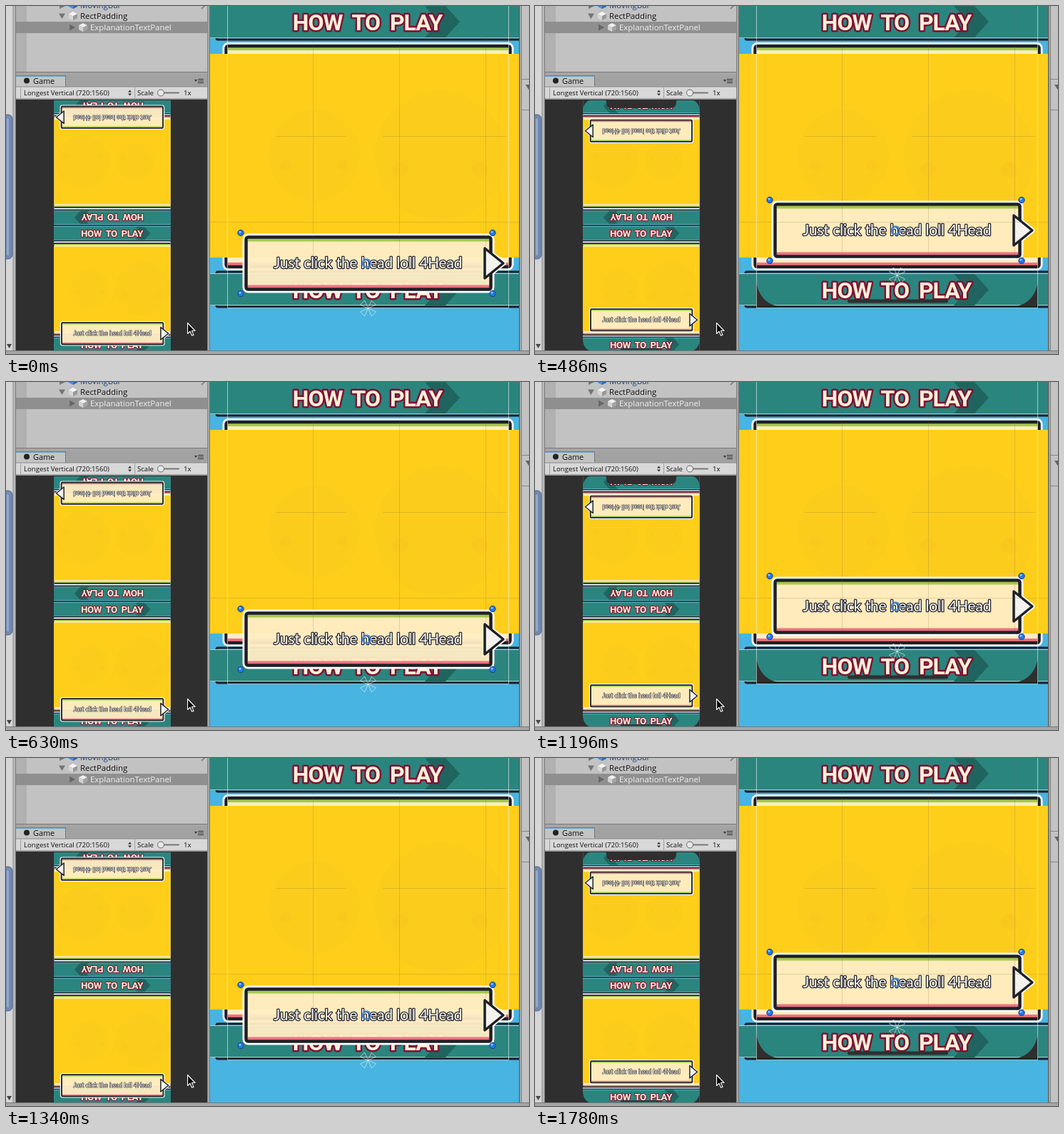
An HTML page for the animation above (1.96 s loop, 733x487 px).

```html
<!DOCTYPE html>
<html lang="en">
<head>
<meta charset="utf-8">
<title>Safe area panel</title>
<style>
  html, body { margin: 0; width: 100%; height: 100%; overflow: hidden; background: #a5a5a5; }
  svg { display: block; width: 733px; height: 487px; }
  text { white-space: pre; }
  .ui { font-family: "Open Sans", "Noto Sans", sans-serif; }
  .title {
    font: 700 32px Roboto, "Open Sans", sans-serif;
    letter-spacing: -1px; word-spacing: 7px; text-anchor: middle;
    fill: #fff0d8; stroke: #7c1434; stroke-width: 5px; stroke-linejoin: round; paint-order: stroke;
  }
  .message {
    font: 400 20.7px Lato, "Open Sans", sans-serif; text-anchor: middle;
    fill: #fff; stroke: #25252b; stroke-width: 2.6px; stroke-linejoin: round; paint-order: stroke;
  }
  .ink { fill: none; stroke: #1e1f24; }
  .guide { fill: none; stroke: #6b6240; stroke-opacity: .2; }
  .frame { fill: none; stroke: #fff; stroke-opacity: .55; }
</style>
</head>
<body>
<svg id="stage" viewBox="0 0 733 487" xmlns="http://www.w3.org/2000/svg"></svg>
<script>
const LOOP = 1960;
const SWITCHES = [270, 630, 980, 1340, 1780];
const TEAL = '#2b857f', INK = '#1e1f24', DARK = '#2f2f2f';

const rect = (x, y, w, h, fill, more = '') =>
  `<rect x="${x}" y="${y}" width="${w}" height="${h}" fill="${fill}" ${more}/>`;
const circle = (x, y, r, fill, more = '') =>
  `<circle cx="${x}" cy="${y}" r="${r}" fill="${fill}" ${more}/>`;
const path = (d, more) => `<path d="${d}" ${more}/>`;
const label = (x, y, size, str, fill = '#111') =>
  `<text class="ui" x="${x}" y="${y}" font-size="${size}" fill="${fill}">${str}</text>`;
const title = y => `<text class="title" x="506.5" y="${y + 12}">HOW TO PLAY</text>`;

// Dark chevron behind a title
const chevron = y => path(`M587 ${y - 22}h29l20 22l-20 22h-29l20 -22z`, 'fill="#20645f"');

const band = (top, bottom) =>
  rect(286, top + 3, 433, bottom - top - 5, TEAL) +
  path(`M719 ${top}H297q-2 0 -2 2`, 'class="ink" stroke-width="3"') +
  path(`M719 ${bottom}H297q-2 0 -2 -2`, 'class="ink" stroke-width="3"') +
  path(`M286 ${top + 2.5}H719M286 ${bottom - 2.5}H719`, 'stroke="#dff0ec" stroke-opacity=".6"');

const face = (x, y, r) =>
  circle(x, y, r, '#f8c722', 'fill-opacity=".4"') +
  [-1, 1].map(s => circle(x + s * r * .62, y + r * .22, r * .12, '#f5c01b', 'fill-opacity=".3"')).join('');

// Rounded box: white rim, dark border, green and pink edge stripes
const box = (x, y, w, h, fill, opacity) => {
  const outline = (color, width) =>
    rect(x, y, w, h, 'none', `rx="3" stroke="${color}" stroke-width="${width}"`);
  return outline('#fff', 10) +
    rect(x, y, w, h, fill, `rx="3" fill-opacity="${opacity}"`) +
    rect(x + 2, y + 2, w - 4, 4, '#a3c94b') + rect(x + 2, y + h - 6, w - 4, 4, '#f0717f') +
    outline(INK, 4.5);
};

const world =
  rect(286, -4, 433, 490, '#48b4e1') +
  band(-4, 47) + chevron(22) + title(22) +
  box(308.5, 56, 398, 309, '#fdedbf', 1) +
  rect(286, 67, 433, 285, '#fece1b') +
  face(432, 209, 64) + face(608, 209, 91) +
  band(372, 421) + chevron(397) + title(397);

// Message box with its pointer, drawn at the lower position
const ARROW = 'M671 339V381L697 360Z';
const panel =
  path(ARROW, 'fill="#fff" stroke="#fff" stroke-width="7" stroke-linejoin="round"') +
  box(336.5, 323.5, 343, 73, '#ffeec4', .95) +
  path(ARROW, `fill="#f3f2ee" stroke="${INK}" stroke-width="3.5" stroke-linejoin="round"`) +
  '<text class="message" x="507.5" y="367">Just click the head loll 4Head</text>';

// Rounded screen corners and home bar of the phone
const corners =
  path('M310 384V420H340C323 417 312 403 310 384Z M705 384V420H675C692 417 703 403 705 384Z', `fill="${DARK}"`) +
  rect(438, 410.5, 141, 5, DARK, 'rx="2.5"');

const lift = safe => `transform="translate(0 ${safe ? -46 : 0})"`;

const handle = (x, y) => circle(x, y, 4.2, '#2377e8', 'stroke="#163f86" stroke-width="1"') +
  circle(x - 1, y - 1.2, 1.5, '#8fc0ff');

const anchor = [0, 90, 180, 270].map(a =>
  path('M0 0L5 11L11 5Z', `transform="rotate(${a})" fill="none" stroke="#fff" stroke-opacity=".55"`)).join('');

const gizmos =
  [329, 682].map(x => handle(x, 317.5) + handle(x, 402.5)).join('') +
  circle(505.5, 360, 5.5, 'none', 'stroke="#377edb" stroke-width="2.5" stroke-opacity=".85"') +
  `<g transform="translate(507.5 423)">${anchor}</g>`;

const guides =
  path('M430.5 0V352M551.5 0V352M672.5 0V352M286 302.5H719M378 182.5H477M528 182.5H702', 'class="guide"') +
  path('M310.5 0V422.5H704.5V0', 'class="frame"');

const notch = path('M97 131q3 0 3 4q0 8 9 8H189q9 0 9 -8q0 -4 3 -4Z', `fill="${DARK}"`);

const defs = (id, safe) => `<g id="${id}Scene">
    <use href="#world"/>${safe ? corners : ''}<g ${lift(safe)}>${panel}</g></g>
  <g id="${id}Half" clip-path="url(#halfClip)">
    <use href="#${id}Scene" transform="translate(67 308.9) scale(.415) translate(-310 0)"/></g>`;

// The editor scene, and the phone showing it twice, once upside down
const view = (id, safe) => `<g id="${id}">
  <g clip-path="url(#sceneClip)"><use href="#${id}Scene"/>${guides}<g ${lift(safe)}>${gizmos}</g></g>
  <g clip-path="url(#phoneClip)">
    <use href="#${id}Half"/>
    <use href="#${id}Half" transform="rotate(180 149 307)"/>
    ${safe ? notch : ''}
  </g></g>`;

const cube = (x, y, a, b, c) =>
  path(`M${x} ${y - 6}l6 3l-6 3l-6 -3z`, `fill="${a}"`) +
  path(`M${x - 6} ${y - 3}l6 3v6l-6 -3z`, `fill="${b}"`) +
  path(`M${x + 6} ${y - 3}l-6 3v6l6 -3z`, `fill="${c}"`);

const hierarchy =
  rect(14, 0, 268, 92, '#c2c2c2') + rect(14, 0, 15, 92, '#b1b1b1') + rect(14, 22, 268, 16, '#8f8f8f') +
  path('M75 -4L83 0L75 4Z', 'fill="#777"') +
  cube(94, -2, '#8bb9ee', '#4d8fdf', '#2d6bc0') + label(104, 3, 11.4, 'MovingBar', '#1c3f86') +
  path('M274 -4L278 0L274 4', 'fill="none" stroke="#777" stroke-width="1.5"') +
  path('M74 10.5H83L78.5 18Z', 'fill="#747474"') +
  cube(94, 14, '#f5f5f5', '#d6d6d6', '#989898') + label(104, 18, 11.4, 'RectPadding') +
  path('M89 25.5V34.5L97 30Z', 'fill="#666"') +
  cube(108, 30, '#f0f0f0', '#d3d3d3', '#a4a4a4') + label(118, 34, 11.4, 'ExplanationTextPanel', '#f1f1f1') +
  rect(14, 92, 268, 1, '#777');

const gamePane =
  rect(14, 97, 268, 16, '#a2a2a2') + rect(14, 97, 69, 16, '#c4c4c4') + rect(14, 97, 69, 1.5, '#4684cf') +
  rect(83, 97, 1, 16, '#777') +
  circle(29, 104.5, 4, '#222') + label(38, 108.5, 10.9, 'Game') +
  path('M264 103H268L266 106Z', 'fill="#333"') +
  path('M269 102.5H277M269 105H277M269 107.5H277', 'stroke="#333" stroke-width="1"') +
  rect(14, 113, 268, 17, '#d8d8d8') + rect(14, 112.5, 268, 1, '#8b8b8b') + rect(14, 129.5, 268, 1, '#777') +
  path('M20.5 114V129M180.5 114V129', 'stroke="#a0a0a0"') +
  label(25, 125, 9.6, 'Longest Vertical (720:1560)') +
  path('M171 120.5H176L173.5 117.5ZM171 122.5H176L173.5 125.5Z', 'fill="#333"') +
  label(184, 125, 9.6, 'Scale') + rect(215, 120.5, 28, 2, '#777', 'rx="1"') +
  circle(217, 121.5, 4.5, '#e8e8e8', 'stroke="#666"') + label(249, 125, 9.6, '1x') +
  rect(14, 131, 268, 351, DARK);

const edges =
  rect(0, 0, 13, 482, '#b8b8b8') + rect(0, 0, 9, 482, '#d6d6d6') + rect(9.5, 0, 1, 482, '#999') +
  rect(-5, 152, 14, 202, '#7189b2', 'rx="6" stroke="#4f648c"') + rect(1, 157, 3, 192, '#93a9cd', 'rx="1.5"') +
  path('M1 473H8L4.5 479Z', 'fill="#444"') +
  rect(13, 0, 1, 482, '#777') + rect(282, 0, 1, 482, '#858585') + rect(285, 0, 1, 482, '#777') +
  rect(719, 0, 1, 482, '#555') + rect(720, 0, 3, 482, '#a5a5a5') + rect(723, 0, 10, 482, '#c2c2c2') +
  rect(722, 0, 1, 482, '#858585') + rect(723, 102, 10, 1, '#858585') + rect(723, 145, 10, 1, '#858585') +
  path('M728 110H737L732.5 117Z', 'fill="#666"') +
  rect(0, 482, 733, 1, '#777');

const cursor = path('M254.5 443.5V458.5L258 455.3L260.6 461.3L263 460.2L260.4 454.5H265Z',
  'fill="#080808" stroke="#fff" stroke-width="1.1" stroke-linejoin="round"');

document.getElementById('stage').innerHTML = `
  <defs>
    <clipPath id="sceneClip">${rect(286, 0, 433, 482, '#000')}</clipPath>
    <clipPath id="halfClip">${rect(67, 307, 163.5, 175, '#000')}</clipPath>
    <clipPath id="phoneClip">${rect(67, 131, 163.5, 351, '#000')}</clipPath>
    <g id="world">${world}</g>
    ${defs('full', false)}${defs('safe', true)}
  </defs>
  ${rect(0, 0, 733, 487, '#a5a5a5')}${edges}${hierarchy}${gamePane}
  ${view('full', false)}${view('safe', true)}${cursor}`;

const full = document.getElementById('full'), safe = document.getElementById('safe');
const start = performance.now();

// Each switch time toggles the safe area on or off
function draw() {
  const t = (performance.now() - start) % LOOP;
  const on = SWITCHES.filter(s => t >= s).length % 2 === 1;
  full.style.display = on ? 'none' : '';
  safe.style.display = on ? '' : 'none';
  requestAnimationFrame(draw);
}
draw();
</script>
</body>
</html>
```
